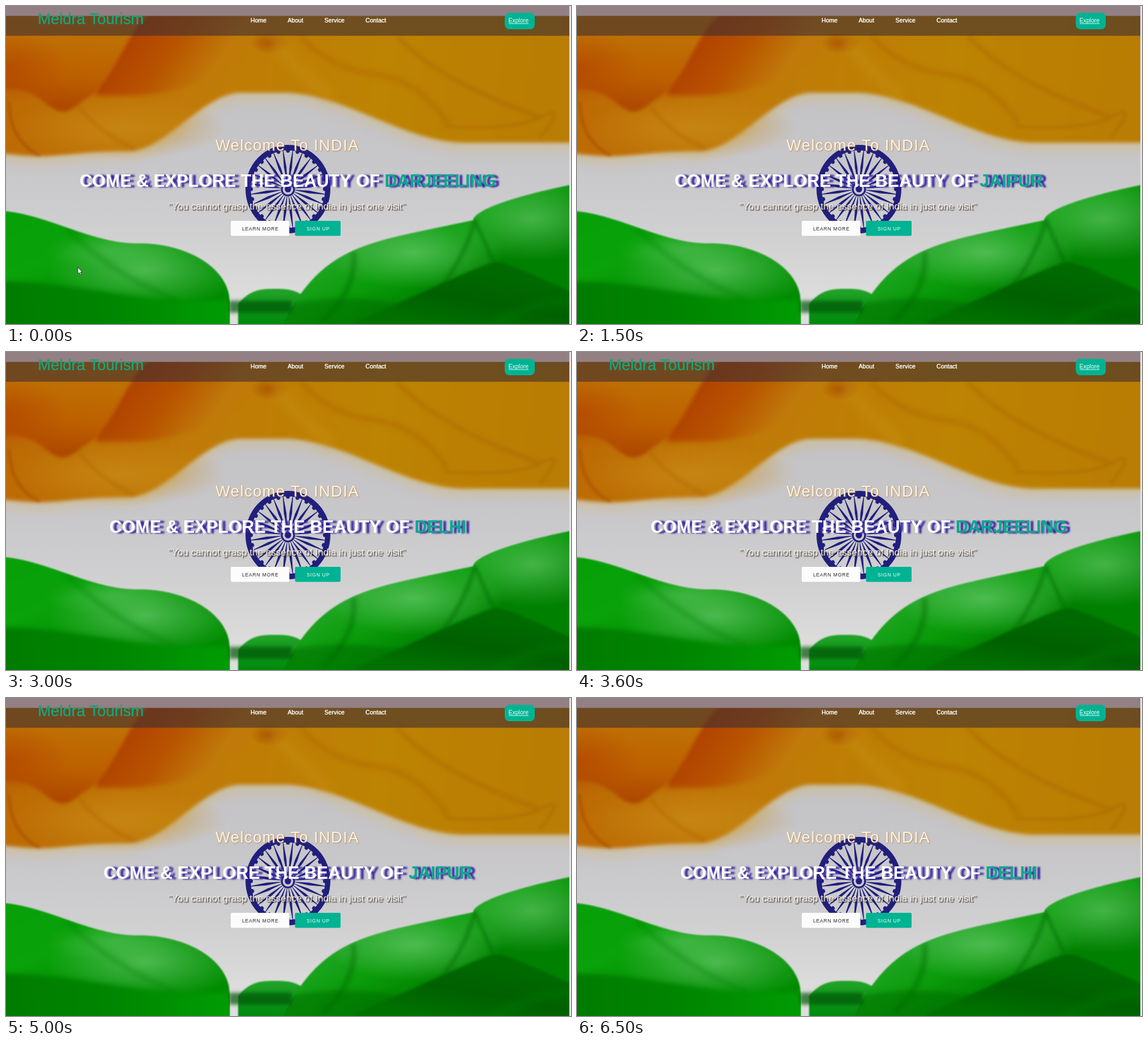
Recreate the animation shown at these times as an HTML page with a canvas. Size 998 px wide and 561 px high, loop 6700 ms.

```html
<!DOCTYPE html>
<html lang="en">
<head>
<meta charset="utf-8">
<title>Travel landing page</title>
<style>
  html, body { margin: 0; width: 100%; height: 100%; overflow: hidden; background: #e4e2e4; }
  canvas { display: block; }
</style>
</head>
<body>
<canvas id="stage" width="998" height="561"></canvas>
<script>
const W = 998, H = 561, LOOP = 6700;
const EDGE = 995, PHOTO_TOP = 17.5, NAV_BOTTOM = 52.5;
const TOP = -40, BOTTOM = 600;
const TEAL = '#00b393', NAVY = '#211f7c';
const SANS = '"Liberation Sans", Arial, sans-serif';
const CITIES = ['DARJEELING', 'AGRA', 'JAIPUR', 'KERALA', 'DELHI'];
const CITY_MS = 700, CITY_SHIFT = 200;
const HEADLINE = 'COME & EXPLORE THE BEAUTY OF ';

const ctx = document.getElementById('stage').getContext('2d');

const clamp = v => Math.max(0, Math.min(1, v));
const ramp = (x, a, b) => clamp((x - a) / (b - a));
const smooth = (x, a, b) => ramp(x, a, b) ** 2 * (3 - 2 * ramp(x, a, b));
const bump = (x, mid, width) => Math.exp(-(((x - mid) / width) ** 2));

// Edges of the cloth, each as y over x
const saffronHem = x =>
  256 + 9 * bump(x, 60, 75) - 103 * smooth(x, 215, 415) + 88 * smooth(x, 490, 810);
const drapeHem = x => 146 + 40 * bump(x, 100, 45) - 130 * smooth(x, 150, 260);
const foldHem = x => 158 - 110 * ramp(x, 200, 450) ** 2.6;
const leftHill = x =>
  361 + 58 * smooth(x, -20, 230) + 103 * (1 - Math.sqrt(1 - ramp(x, 235, 395) ** 2));
const middleHill = x => 499 + 21 * Math.abs((x - 475) / 60) ** 3;
const rightHill = x => {
  const d = (825 - x) / 325;
  return d > 0 ? 378 + 68 * d + 94 * d ** 5.4 : 378 - 62 * ((x - 825) / 170) ** .58;
};
const shadowHill = x => 445 + .45 * Math.hypot(x - 868, 16);
const leftLayer = x => 486 + 34 * smooth(x, 0, 330);
const rightLayer = x => 524 - 8 * Math.sin((x - 500) / 60);

function area(edge, x0, x1, side) {
  const path = new Path2D();
  path.moveTo(x0, side);
  for (let x = x0; x <= x1; x++) path.lineTo(x, edge(x));
  path.lineTo(x1, side);
  path.closePath();
  return path;
}

// Fills a cloth, then paints its folds inside the same outline
function cloth(g, path, fill, blur, inside) {
  g.save();
  if (blur) g.filter = `blur(${blur}px)`;
  g.fillStyle = fill;
  g.fill(path);
  g.filter = 'none';
  if (inside) {
    g.clip(path);
    inside();
  }
  g.restore();
}

function shade(g, x0, y0, x1, y1, ...colors) {
  const s = g.createLinearGradient(x0, y0, x1, y1);
  colors.forEach((c, i) => s.addColorStop(i / (colors.length - 1), c));
  return s;
}

function glow(g, x, y, r, squash, rgb, alpha) {
  g.save();
  g.translate(x, y);
  g.scale(1, squash);
  const s = g.createRadialGradient(0, 0, 0, 0, 0, r);
  s.addColorStop(0, `rgba(${rgb},${alpha})`);
  s.addColorStop(1, `rgba(${rgb},0)`);
  g.fillStyle = s;
  g.fillRect(-r, -r, 2 * r, 2 * r);
  g.restore();
}

function crease(g, path, color, width) {
  g.save();
  g.filter = `blur(${width * .6}px)`;
  g.strokeStyle = color;
  g.lineWidth = width;
  g.stroke(new Path2D(path));
  g.restore();
}

function paintSaffron(g) {
  const rust = 'rgba(164,64,0,.6)', amber = 'rgba(170,96,0,.45)';
  cloth(g, area(x => saffronHem(x) + 12, -30, 1030, TOP), 'rgba(214,186,120,.5)', 10);
  cloth(g, area(saffronHem, -30, 1030, TOP),
    shade(g, 0, 40, 995, 160, '#bd6a04', '#c07a08', '#bd8302', '#b97c04'), 3);
  glow(g, 200, 215, 190, .3, '200,140,22', .7);

  cloth(g, area(foldHem, 160, 450, TOP), shade(g, 210, 60, 340, 150, '#b04200', '#b85400', '#c07a0a'), 4);
  cloth(g, area(drapeHem, -30, 250, TOP), shade(g, 70, 50, 60, 190, '#bf7004', '#bd6000', '#aa4200'), 3);
  glow(g, 0, 110, 110, .6, '176,64,0', .6);
  crease(g, 'M5 170Q8 240 60 264', rust, 4);
  crease(g, 'M130 178Q165 225 228 252', amber, 5);

  glow(g, 465, 65, 34, .6, '166,68,0', .7);
  crease(g, 'M470 55Q510 110 575 162', 'rgba(200,148,24,.5)', 16);
  crease(g, 'M520 52Q570 110 650 120T780 207', amber, 7);
  crease(g, 'M690 52Q760 130 940 195', amber, 6);
  crease(g, 'M775 212Q900 220 946 195T943 232', amber, 4);
}

function paintGreen(g) {
  const deep = 'rgba(0,106,0,.6)', light = '88,192,92';

  cloth(g, area(middleHill, 410, 535, BOTTOM), shade(g, 0, 500, 0, 561, '#22a428', '#008a0c'), 1);
  cloth(g, area(leftHill, -30, 395, BOTTOM), shade(g, 0, 365, 80, 561, '#08a008', '#0aa20a', '#008c00'), 1, () => {
    glow(g, 245, 465, 175, .4, light, .85);
    glow(g, 190, 430, 120, .3, light, .5);
    cloth(g, area(leftLayer, -30, 420, BOTTOM), shade(g, 0, 540, 390, 520, '#007c00', '#008600', '#009c04'), 4);
    crease(g, 'M105 392Q190 475 300 519', 'rgba(0,130,0,.4)', 8);
  });

  cloth(g, area(rightHill, 480, 1030, BOTTOM), shade(g, 600, 420, 680, 561, '#22a626', '#0a9c0a', '#008000'), 1, () => {
    glow(g, 930, 375, 150, .5, light, .75);
    glow(g, 720, 435, 160, .4, light, .85);
    cloth(g, area(rightLayer, 480, 780, BOTTOM), 'rgba(0,110,0,.55)', 4);
    cloth(g, area(shadowHill, 620, 1030, BOTTOM), shade(g, 780, 455, 760, 561, '#006a00', '#006000', '#007000'), 2);
    crease(g, 'M828 378Q842 410 862 453', deep, 5);
    crease(g, 'M828 378Q812 440 768 496', deep, 6);
    crease(g, 'M614 434Q620 500 560 555', deep, 7);
    crease(g, 'M1000 520Q920 524 850 570', 'rgba(0,122,0,.6)', 12);
  });
  cloth(g, area(() => 520, 394, 505, 541), 'rgba(0,84,8,.7)', 3);
}

function paintWheel(g) {
  const step = Math.PI / 24;
  const disc = (x, y, r) => {
    g.beginPath();
    g.arc(x, y, r, 0, 7);
  };
  g.save();
  g.translate(498, 323);
  g.scale(75, 78);
  g.fillStyle = g.strokeStyle = NAVY;
  g.lineWidth = .125;
  disc(0, 0, .937);
  g.stroke();
  for (let i = 0; i < 24; i++) {
    disc(0, .87, .045);
    g.fill();
    g.rotate(step);
    g.fill(new Path2D('M0 .1L.03 .5L.006 .9H-.006L-.03 .5Z'));
    g.rotate(step);
  }
  disc(0, 0, .165);
  g.fill();
  g.strokeStyle = '#c9c8d2';
  g.lineWidth = .05;
  disc(0, 0, .1);
  g.stroke();
  g.restore();
}

function text(g, str, x, y, font, color, spacing = 0, shadow) {
  g.save();
  g.font = `${font} ${SANS}`;
  g.letterSpacing = spacing + 'px';
  g.fillStyle = color;
  if (shadow) [g.shadowOffsetX, g.shadowOffsetY, g.shadowBlur, g.shadowColor] = shadow;
  g.fillText(str, x, y);
  g.restore();
}

function button(g, x, y, w, h, r, color) {
  g.fillStyle = color;
  g.beginPath();
  g.roundRect(x, y, w, h, r);
  g.fill();
}

function buildPage() {
  const page = document.createElement('canvas');
  page.width = W;
  page.height = H;
  const g = page.getContext('2d');
  g.fillStyle = '#e4e2e4';
  g.fillRect(0, 0, W, H);

  g.save();
  g.beginPath();
  g.rect(0, 0, EDGE, H);
  g.clip();
  g.fillStyle = shade(g, 0, 150, 0, 530, '#c3c2c4', '#c7c6c9', '#d0d0d1', '#dededd');
  g.fillRect(0, 0, W, H);
  paintSaffron(g);
  paintWheel(g);
  paintGreen(g);
  g.restore();

  g.fillStyle = 'rgba(60,45,50,.6)';
  g.fillRect(0, 0, EDGE, NAV_BOTTOM);
  g.fillStyle = '#928084';
  g.fillRect(0, 0, EDGE, PHOTO_TOP);

  const links = { Home: 432, About: 497.5, Service: 562.5, Contact: 635 };
  for (const name in links) text(g, name, links[name], 28.5, '10.6px', '#fff', 0, [0, 0, 1, '#fff']);
  button(g, 881, 12, 53, 29, 8, TEAL);
  text(g, 'Explore', 887.5, 29, '10.5px', '#f2fffb');
  g.fillStyle = '#e4fff8';
  g.fillRect(888, 30.5, 35, 1);

  text(g, 'Welcome To INDIA', 370, 255, '27.3px', '#fdf3e2', 1.5, [1, 1, 2, 'rgba(190,130,50,.8)']);
  text(g, '"You cannot grasp the essence of India in just one visit"', 287, 359,
    '17.1px', '#f1eee8', 0, [1.5, 1.5, 1.5, 'rgba(60,50,40,.9)']);

  button(g, 397, 379, 103.5, 26.5, 2, '#fcfcfc');
  text(g, 'LEARN MORE', 417, 396, '8.5px', '#26262a', .85);
  button(g, 510.5, 379, 80.5, 26.5, 2, TEAL);
  text(g, 'SIGN UP', 531, 396, '8.5px', '#f4fffc', .85);
  return page;
}

function drawHeadline(t) {
  const city = CITIES[Math.floor((t + CITY_SHIFT) / CITY_MS) % CITIES.length];
  const font = 'bold 30.5px';
  ctx.font = `${font} ${SANS}`;
  const lead = ctx.measureText(HEADLINE).width;
  const x = 497.7 - (lead + ctx.measureText(city).width) / 2;
  const shadow = [7, 1, 3, '#3423a0'];
  text(ctx, HEADLINE, x, 318.5, font, '#fff', 0, shadow);
  text(ctx, city, x + lead, 318.5, font, '#08a88e', 0, shadow);
}

// The brand shrinks away, rests, then zooms back in
function drawBrand(t) {
  const p = t % 5000;
  const out = ramp(p, 0, 1400), back = ramp(p, 2500, 3000);
  const leaving = p < 2500;
  const scale = leaving ? 1 - .45 * out ** 1.7 : 1 - .7 * (1 - back) ** 3;
  ctx.save();
  ctx.globalAlpha = leaving ? 1 - out ** 6 : clamp(back * 2);
  ctx.translate(149.8, 22.5);
  ctx.scale(scale, scale);
  ctx.textAlign = 'center';
  text(ctx, 'Meldra Tourism', 0, 9.5, '27.4px', '#17a47a', 0, [0, 0, 1, '#17a47a']);
  ctx.restore();
}

function drawPointer(t) {
  if (t >= 400) return;
  ctx.save();
  ctx.translate(127, 461);
  ctx.fillStyle = '#fff';
  ctx.strokeStyle = '#222';
  ctx.lineWidth = .8;
  const arrow = new Path2D('M0 0V11.5L2.7 9.2L4.6 13.4L6.3 12.6L4.5 8.5H7.6Z');
  ctx.fill(arrow);
  ctx.stroke(arrow);
  ctx.restore();
}

const page = buildPage();
const start = performance.now();

function frame(now) {
  const t = Math.max(0, now - start) % LOOP;
  ctx.drawImage(page, 0, 0);
  drawBrand(t);
  drawHeadline(t);
  drawPointer(t);
  requestAnimationFrame(frame);
}
frame(start);
</script>
</body>
</html>
```
